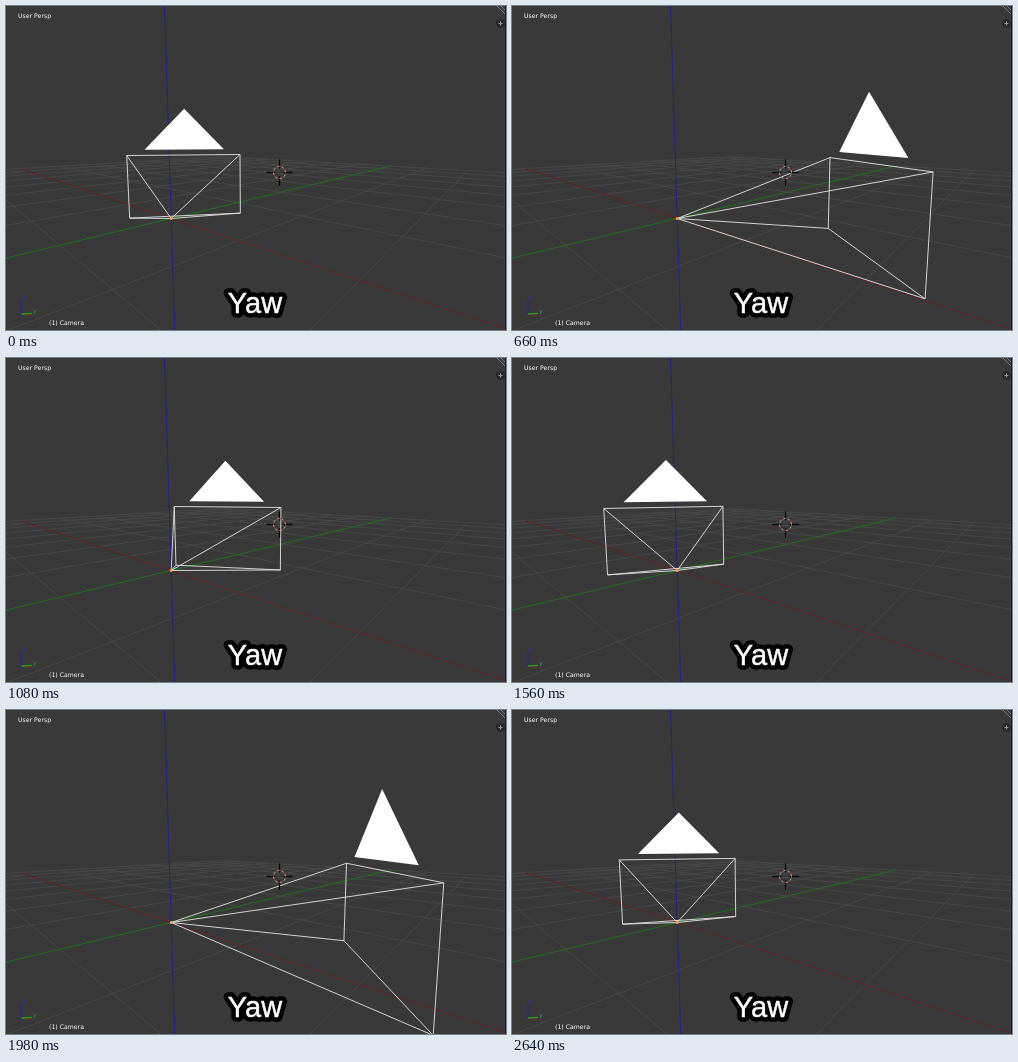
An HTML page with a canvas that plays this animation: 500 by 324 pixels, repeating every 2700 ms.

```html
<!DOCTYPE html>
<html lang="en">
<head>
<meta charset="utf-8">
<title>Yaw</title>
<style>
  html, body { margin: 0; width: 100%; height: 100%; overflow: hidden; background: #393939; }
  canvas { display: block; width: 500px; height: 324px; }
</style>
</head>
<body>
<canvas id="stage" width="500" height="324"></canvas>
<script>
const ctx = document.getElementById('stage').getContext('2d');
const RAD = Math.PI / 180;
const STEP = 60, STEPS = 45;

// View: focal length in pixels, screen centre, slight downward pitch.
const FOCAL = 277, CX = 249.2, CY = 162.5, SIN = 0.101, COS = 0.995;
const UNIT = 94, GRID = 8, NEAR = 20;
const Y_HEADING = 41 * RAD, X_HEADING = 131 * RAD;

// Swing of the yaw: [step, phase in degrees].
const SWING = [[0, -131.7], [11, 35.2], [18, 110], [26, 212.4], [30, 304.5], [37, 417.8], [44, 498.6]];

function yawAt(step) {
  let i = 0;
  while (i < SWING.length - 2 && step > SWING[i + 1][0]) i++;
  const [s0, p0] = SWING[i], [s1, p1] = SWING[i + 1];
  const phase = p0 + (p1 - p0) * (step - s0) / (s1 - s0);
  return (30 + 60 * Math.cos(phase * RAD)) * RAD;
}

// Right, forward and up offsets from the pivot into view space.
const toView = ([r, g, z]) => [r - 84, 50 - z * COS - g * SIN, FOCAL + g * COS - z * SIN];
const toScreen = ([x, y, w]) => [CX + FOCAL * x / w, CY + FOCAL * y / w];
const project = p => toScreen(toView(p));

function line(x0, y0, x1, y1, color, width = 1) {
  ctx.strokeStyle = color;
  ctx.lineWidth = width;
  ctx.beginPath();
  ctx.moveTo(x0, y0);
  ctx.lineTo(x1, y1);
  ctx.stroke();
}

function line3d(from, to, color) {
  let a = toView(from), b = toView(to);
  if (a[2] < NEAR && b[2] < NEAR) return;
  const clip = (p, q) => {
    if (p[2] >= NEAR) return p;
    const k = (NEAR - p[2]) / (q[2] - p[2]);
    return p.map((v, i) => v + (q[i] - v) * k);
  };
  a = clip(a, b);
  b = clip(b, a);
  line(...toScreen(a), ...toScreen(b), color);
}

function floorPoint(x, y) {
  return [
    UNIT * (x * Math.sin(X_HEADING) + y * Math.sin(Y_HEADING)),
    UNIT * (x * Math.cos(X_HEADING) + y * Math.cos(Y_HEADING)),
    0
  ];
}

function drawFloor() {
  for (let i = -GRID; i <= GRID; i++) {
    if (i === 0) continue;
    line3d(floorPoint(i, -GRID), floorPoint(i, GRID), '#474747');
    line3d(floorPoint(-GRID, i), floorPoint(GRID, i), '#474747');
  }
  line3d(floorPoint(-GRID, 0), floorPoint(GRID, 0), '#642222');
  line3d(floorPoint(0, -GRID), floorPoint(0, GRID), '#207020');
  line3d([0, 0, -400], [0, 0, 400], '#22228a');
}

function drawCamera(yaw) {
  const depth = UNIT * 2.1875, aspect = 0.5625;
  const s = Math.sin(yaw), c = Math.cos(yaw);
  const at = (x, z) => project([
    depth * s + UNIT * x * c,
    depth * c - UNIT * x * s,
    UNIT * z
  ]);
  const apex = project([0, 0, 0]);
  const corners = [at(-1, aspect), at(1, aspect), at(1, -aspect), at(-1, -aspect)];
  corners.forEach((p, i) => {
    line(...p, ...corners[(i + 1) % 4], '#e4e4e4', 0.9);
    line(...apex, ...p, '#e4e4e4', 0.9);
  });

  ctx.fillStyle = '#fff';
  ctx.beginPath();
  ctx.moveTo(...at(-0.7, aspect + 0.1));
  ctx.lineTo(...at(0.7, aspect + 0.1));
  ctx.lineTo(...at(0, 1.1 * (aspect + 0.7)));
  ctx.fill();

  ctx.fillStyle = '#f0a040';
  ctx.beginPath();
  ctx.arc(...apex, 1.5, 0, 2 * Math.PI);
  ctx.fill();
}

function drawCursor() {
  const x = 273.5, y = 166.5;
  for (const [dx, dy] of [[1, 0], [-1, 0], [0, 1], [0, -1]]) {
    line(x + dx * 4, y + dy * 4, x + dx * 13, y + dy * 13, '#000', 1.2);
  }
  ctx.lineWidth = 1;
  for (let i = 0; i < 16; i++) {
    ctx.strokeStyle = i % 2 ? '#c8b8b8' : '#a83030';
    ctx.beginPath();
    ctx.arc(x, y, 6, i * Math.PI / 8, (i + 1) * Math.PI / 8);
    ctx.stroke();
  }
}

function label(text, x, y, color, size = 6.2) {
  ctx.font = size + 'px "DejaVu Sans", sans-serif';
  ctx.fillStyle = color;
  ctx.fillText(text, x, y);
}

function drawOverlay() {
  label('User Persp', 12, 12, '#fff');
  label('(1) Camera', 43, 319, '#fff');

  line(15.5, 308, 25, 309.3, '#a01818');
  line(15.5, 308, 26, 307.3, '#20a020', 1.3);
  line(15.5, 308, 15.5, 293, '#2020e0', 1.4);
  label('z', 16.5, 293, '#3030e0', 6);
  label('y', 27, 307, '#20b020', 6);

  line(499.5, 0, 499.5, 324, '#202020');
  line(491, 0, 499, 8, '#777');
  line(495, 0, 499, 4, '#777');
  ctx.fillStyle = '#2a2a2a';
  ctx.beginPath();
  ctx.arc(494.5, 17.5, 4.5, 0, 2 * Math.PI);
  ctx.fill();
  line(492.5, 17.5, 496.5, 17.5, '#999');
  line(494.5, 15.5, 494.5, 19.5, '#999');

  ctx.font = '29px "Liberation Sans", Arial, sans-serif';
  ctx.textAlign = 'center';
  ctx.lineJoin = 'round';
  ctx.lineWidth = 9.5;
  ctx.strokeStyle = '#000';
  ctx.strokeText('Yaw', 249, 307);
  ctx.lineWidth = 0.5;
  ctx.strokeStyle = ctx.fillStyle = '#fff';
  ctx.fillText('Yaw', 249, 307);
  ctx.strokeText('Yaw', 249, 307);
  ctx.textAlign = 'left';
}

const start = performance.now();

function render() {
  const step = Math.floor(Math.max(0, performance.now() - start) / STEP) % STEPS;
  ctx.fillStyle = '#393939';
  ctx.fillRect(0, 0, 500, 324);
  drawFloor();
  drawCamera(yawAt(step));
  drawCursor();
  drawOverlay();
  requestAnimationFrame(render);
}
render();
</script>
</body>
</html>
```
